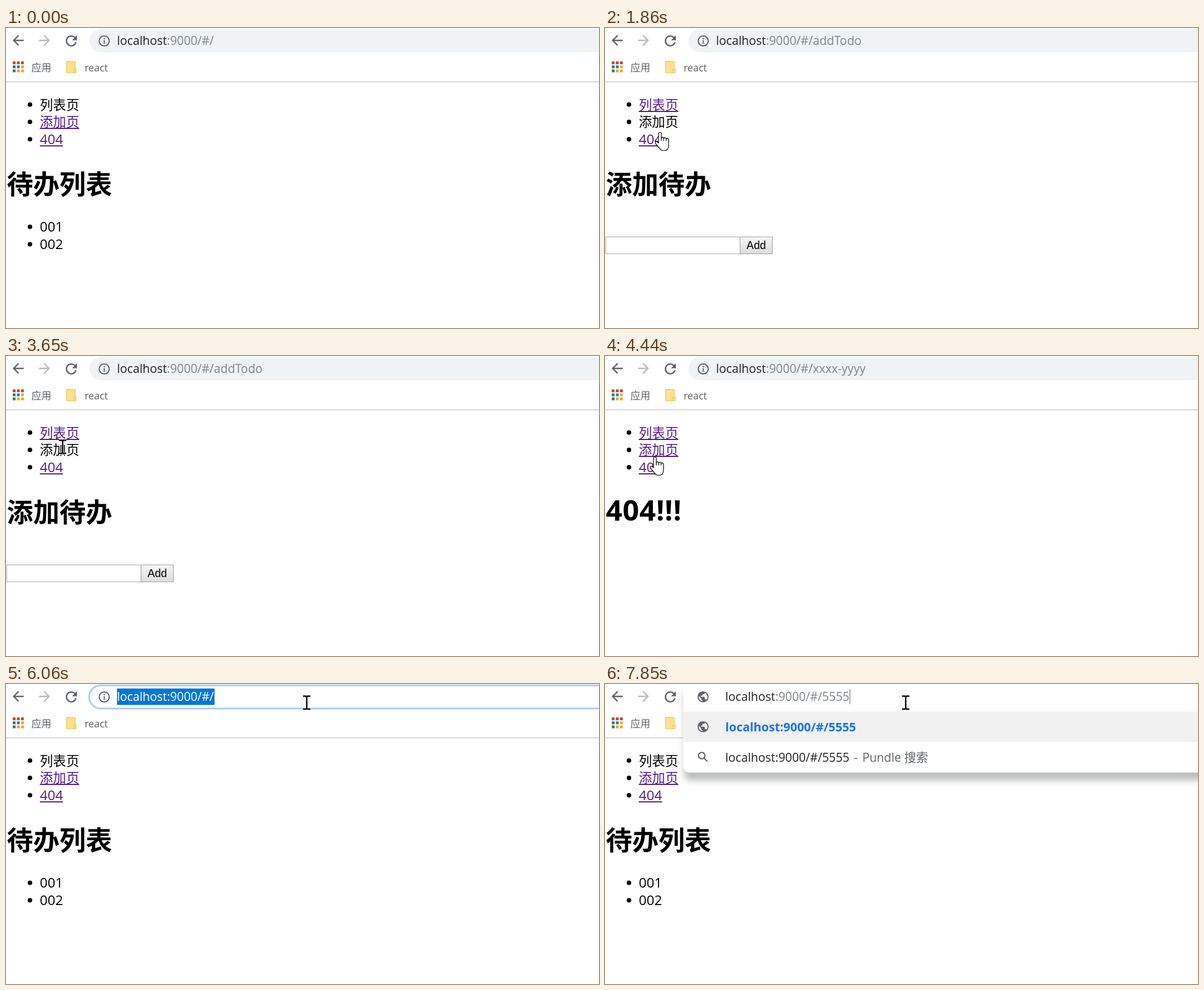
Animation, 1052 px wide and 532 px high, one loop 8 s. Source, as an HTML page:

```html
<!DOCTYPE html>
<html lang="zh">
<head>
<meta charset="utf-8">
<title>Router demo</title>
<style>
  html, body { margin: 0; width: 100%; height: 100%; overflow: hidden; background: #fff; }
  svg { display: block; width: 1052px; height: 532px; }
  text { font: 21.15px "Open Sans", "Noto Sans CJK SC", "Noto Sans CJK", sans-serif; fill: #202124; white-space: pre; }
  .cjk { font-size: 23.33px; }
  .num { font-size: 24px; }
  .mark { font-size: 17.7px; fill: #5f6368; }
  .h1 { font-size: 46.67px; font-weight: 700; }
  .body text { fill: #000; }
  .soft { fill: #80868b; }
  .icon { fill: #5f6368; }
</style>
</head>
<body>
<svg viewBox="0 0 1052 532">
  <defs>
    <path id="back" d="M20 11H7.83l5.59-5.59L12 4l-8 8 8 8 1.41-1.41L7.83 13H20z"/>
    <path id="globe" d="M12 2a10 10 0 1 0 0 20 10 10 0 0 0 0-20zm-1 17.93c-3.95-.49-7-3.85-7-7.93 0-.62.08-1.21.21-1.79L9 15v1c0 1.1.9 2 2 2zm6.9-2.54c-.26-.81-1-1.39-1.9-1.39h-1v-3c0-.55-.45-1-1-1H8v-2h2c.55 0 1-.45 1-1V7h2c1.1 0 2-.9 2-2v-.41c2.93 1.19 5 4.06 5 7.41 0 2.08-.8 3.97-2.1 5.39z"/>
    <path id="beam" fill="none" d="M-6.5-11.5h4.5q2 0 2 2V9.5q0 2-2 2h-4.5M6.5-11.5H2q-2 0-2 2V9.5q0 2 2 2H6.5"/>
    <filter id="blur" x="-10%" y="-30%" width="120%" height="160%"><feGaussianBlur stdDeviation="6"/></filter>
  </defs>

  <!-- toolbar -->
  <use href="#back" class="icon" transform="translate(7 7.4) scale(1.22)"/>
  <use href="#back" fill="#b9bbbe" transform="translate(83 7.4) scale(-1.22 1.22)"/>
  <path class="icon" transform="translate(101 8) scale(1.24)" d="M17.65 6.35A8 8 0 1 0 19.73 14h-2.08A6 6 0 1 1 16.22 7.78L13 11h7V4z"/>
  <rect id="pill" x="148" y="2" width="930" height="41" rx="20.5" fill="#eff3f5"/>
  <rect id="ring" x="147.5" y="2.5" width="930" height="41" rx="20.5" fill="#fff" stroke="#aecbfa" stroke-width="3"/>
  <circle cx="174.3" cy="23" r="8.9" fill="none" stroke="#5f6368" stroke-width="2"/>
  <path class="icon" d="M173.3 21.8h2v6h-2zM173.3 17.8h2v2.2h-2z"/>
  <rect id="select" x="197" y="8" width="173" height="29" fill="#0078d7"/>
  <text x="197" y="30"><tspan id="host">localhost</tspan><tspan id="path" class="soft"></tspan></text>
  <path id="caret" d="M370.5 9v27" stroke="#5f6368"/>

  <!-- bookmarks -->
  <g id="apps"></g>
  <text class="mark" x="45" y="76.7">应用</text>
  <path d="M107.5 59.5h15.5V73h1.5v6.5h-17z" fill="#ffe08f" stroke="#e8be55"/>
  <path d="M120.5 79v-6h3" fill="none" stroke="#e8be55"/>
  <text class="mark" x="139.5" y="76.5">react</text>
  <path d="M0 95.5h1052" stroke="#b6b6b6"/>

  <!-- page -->
  <g class="body">
    <g id="links"></g>
    <text id="title" class="h1" x="1.5"></text>
    <g id="list">
      <circle cx="42.5" cy="352.5" r="4"/><circle cx="42.5" cy="383.5" r="4"/>
      <text class="num" x="60" y="361">001</text><text class="num" x="60" y="392">002</text>
    </g>
    <g id="form">
      <linearGradient id="face" x2="0" y2="1"><stop stop-color="#f6f6f6"/><stop offset="1" stop-color="#dcdcdc"/></linearGradient>
      <rect x="1.5" y="370.5" width="238" height="30" fill="#fff" stroke="#a9a9a9"/>
      <rect x="239.5" y="370.5" width="57.5" height="30" fill="url(#face)" stroke="#9c9c9c"/>
      <text x="251" y="392" style="font:19.45px 'Liberation Sans',Arial,sans-serif">Add</text>
    </g>
  </g>

  <!-- suggestions -->
  <g id="drop">
    <rect x="141" y="10" width="960" height="161" rx="10" fill="#3c4043" opacity=".34" filter="url(#blur)"/>
    <rect x="139" y="-4" width="960" height="161" rx="11" fill="#fff"/>
    <path d="M139 49h913v54H139z" fill="#f1f1f1"/>
    <use href="#globe" class="icon" transform="translate(162.2 11) scale(.98)"/>
    <use href="#globe" class="icon" transform="translate(162.2 64) scale(.98)"/>
    <path d="M175.8 131.5l6 6M177.3 127a5.7 5.7 0 1 1-11.4 0a5.7 5.7 0 1 1 11.4 0" fill="none" stroke="#5f6368" stroke-width="2.2"/>
    <text x="213.5" y="30">localhost<tspan class="soft">:9000/#/<tspan class="typed"></tspan></tspan></text>
    <path id="caret2" d="M0 9v27" stroke="#5f6368"/>
    <text x="213.5" y="84" style="font-size:21.3px;font-weight:700;fill:#1a73e8">localhost:9000/#/<tspan class="typed"></tspan></text>
    <text x="213.5" y="138">localhost:9000/#/<tspan class="typed"></tspan><tspan dx="8" fill="#5f6368">- </tspan><tspan dx="2.5" fill="#5f6368">Pundle 搜索</tspan></text>
  </g>

  <!-- pointer -->
  <g id="pointer">
    <path id="arrow" d="M0 0V24l5.5-5 4 9.5 4-1.8-4-9.2H17z" fill="#fff" stroke="#000" stroke-width="1.2"/>
    <g id="hand" stroke="#000" stroke-width="1.2" stroke-linejoin="round">
      <path fill="#fff" d="M-2.5 2.5a2.5 2.5 0 0 1 5 0V9.5q2.5-2 4.3.6q2.6-1.6 4.2.8q3-1 4.3 1.6V23q0 9.5-8 9.5Q1 32.5-1 28L-7.5 20.5q-2-4.5 1.5-4.5l3.5 3z"/>
      <path fill="none" d="M2.5 9v6M6.8 10v5M11 11v4"/>
    </g>
    <g id="ibeam">
      <use href="#beam" stroke="#fff" stroke-width="4.5"/>
      <use href="#beam" stroke="#000" stroke-width="2.5"/>
    </g>
    <circle id="flash" r="17" fill="#ff0" opacity=".55"/>
  </g>
</svg>
<script>
const $ = id => document.getElementById(id);
const show = (id, on) => $(id).style.display = on ? '' : 'none';

const pages = [
  { path: '', title: '待办列表', y: 294 },
  { path: 'addTodo', title: '添加待办', y: 294 },
  { path: 'xxxx-yyyy', title: '404!!!', y: 292 }
];
const links = [
  { label: '列表页', css: 'cjk', y: 144.5, w: 70 },
  { label: '添加页', css: 'cjk', y: 175.2, w: 70 },
  { label: '404', css: 'num', y: 206, w: 41 }
];
// press, release, link
const clicks = [[1080, 1160, 1], [2240, 2320, 2], [3020, 3100, 0],
  [3570, 3640, 1], [4200, 4270, 2], [5050, 5130, 0]];
const barClicks = [[5980, 6060], [6520, 6600]];
// start, end, steps, x, y
const moves = [[280, 920, 9, 101, 160], [1480, 1860, 6, 97, 185], [1960, 2010, 2, 79, 205],
  [2480, 2870, 6, 100, 141], [3250, 3420, 3, 100, 161], [3720, 4030, 5, 84, 200],
  [4440, 4440, 1, 88, 179], [4510, 4980, 7, 105, 141], [5290, 5900, 9, 533, 33]];
const keys = [7400, 7610, 7780, 7850];

$('links').innerHTML = links.map(l => `<circle cx="42.5" cy="${l.y - 8.7}" r="4"/>
  <g><text class="${l.css}" x="60" y="${l.y}">${l.label}</text>
  <path d="M60 ${Math.floor(l.y + 2.5)}h${l.w}v2h${-l.w}z"/></g>`).join('');
const linkNodes = $('links').querySelectorAll('g');

const [red, green, blue, gold] = ['#c5432b', '#3f7a5e', '#1a82d8', '#eaa72c'];
$('apps').innerHTML = [red, red, red, green, blue, gold, green, gold, gold].map((c, i) =>
  `<rect x="${12 + i % 3 * 7.3}" y="${59.3 + (i / 3 | 0) * 7.1}" width="5" height="5" fill="${c}"/>`).join('');

// The unknown route never matches its own link, so only the first two become plain text.
const isPlain = (row, page) => row === page && row < 2;

function pointerAt(t) {
  let x = 751, y = 464;
  for (const [start, end, n, tx, ty] of moves) {
    if (t < start) break;
    const step = Math.min(n - 1, Math.floor((t - start) * (n - 1) / (end - start || 1)));
    const f = (step + 1) / n;
    x += (tx - x) * f;
    y += (ty - y) * f;
  }
  return [x, y];
}

function pointerKind(x, y, page) {
  if (y < 44) return 'ibeam';
  const row = Math.floor((y - 121) / 30.7);
  if (!links[row] || x < 60 || x > 60 + links[row].w) return 'arrow';
  return isPlain(row, page) ? 'ibeam' : 'hand';
}

function draw(t) {
  const pressed = ([a, b]) => t >= a && t < b;
  const page = clicks.reduce((p, c) => t >= c[1] ? c[2] : p, 0);
  const active = clicks.find(pressed);

  links.forEach((l, i) => {
    const plain = isPlain(i, page);
    const color = plain ? '#000' : active && active[2] === i ? '#f00' : '#551a8b';
    const [label, line] = linkNodes[i].children;
    label.style.fill = line.style.fill = color;
    line.style.display = plain ? 'none' : '';
  });
  $('title').textContent = pages[page].title;
  $('title').setAttribute('y', pages[page].y);
  $('title').style.fontSize = page === 2 ? '51px' : '';
  $('title').style.letterSpacing = page === 2 ? '.6px' : '';
  show('list', page === 0);
  show('form', page === 1);

  const focused = t >= 5980, selected = t >= 6060 && t < 6520;
  show('pill', !focused);
  show('ring', focused);
  show('select', selected);
  show('caret', t >= 6520 && t < 7070);
  $('path').textContent = ':9000/#/' + pages[page].path;
  $('host').style.fill = $('path').style.fill = selected ? '#fff' : '';

  const typed = keys.filter(k => t >= k).length;
  show('drop', typed > 0);
  document.querySelectorAll('.typed').forEach(n => n.textContent = '5'.repeat(typed));
  $('caret2').setAttribute('transform', `translate(${386.1 + typed * 12.1} 0)`);

  const [x, y] = pointerAt(t), kind = pointerKind(x, y, page);
  show('pointer', t >= 280);
  $('pointer').setAttribute('transform', `translate(${x + .5} ${y})`);
  for (const k of ['arrow', 'hand', 'ibeam']) show(k, k === kind);
  show('flash', active || barClicks.some(pressed));
}

const begin = performance.now();
function tick() {
  draw((performance.now() - begin) % 8000);
  requestAnimationFrame(tick);
}
tick();
</script>
</body>
</html>
```
